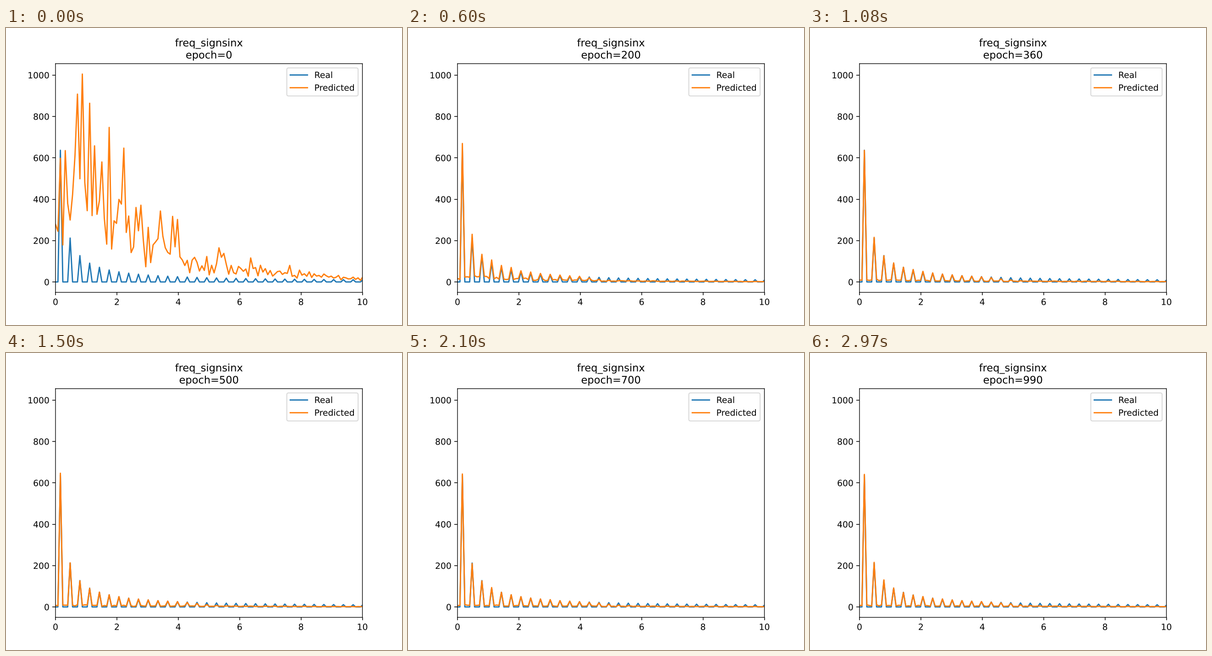
These frames come from a looping animation (864 by 648 pixels, 3000 ms). A matplotlib script:

```python
import numpy as np
import matplotlib.pyplot as plt
from matplotlib.animation import FuncAnimation
from matplotlib.patheffects import Normal

# Unhinted, unsnapped drawing: text and lines keep their subpixel positions
plt.rcParams.update({
    "path.snap": False,
    "text.hinting": "none",
    "path.effects": [Normal()],
    "axes.linewidth": 0.72,
})

FRAMES, STEP = 100, 10
N, BINS = 1000, 127
rng = np.random.default_rng(7)
bins = np.arange(BINS)

# Spectrum of sign(sin x) sampled over two periods
x = np.linspace(-2 * np.pi, 2 * np.pi, N)
freq = np.fft.fftfreq(N, x[1] - x[0])[:BINS]
real = np.abs(np.fft.fft(np.where(np.arange(N) // 250 % 2, -1, 1)))[:BINS]

# Untrained spectrum: tall peaks with random dips between them
peaks = {0: 278, 2: 598, 4: 635, 9: 908, 11: 1005, 14: 864, 16: 658, 19: 580,
         22: 747, 28: 647, 33: 360, 35: 371, 43: 343, 48: 317, 50: 302,
         57: 119, 62: 123, 67: 165, 69: 138, 75: 75, 80: 116, 96: 80, 126: 25}
top = np.interp(bins, list(peaks), list(peaks.values()))
dips = rng.uniform(0.3, 0.7, BINS) + 0.1 * (-1.0) ** bins
start = top * np.where(np.isin(bins, list(peaks)), 1, dips)

ripple = rng.uniform(0.3, 1.2, BINS)
flicker = rng.uniform(0.3, 1.2, (FRAMES, BINS))
wobble = rng.standard_normal((FRAMES, BINS))


def predicted(i):
    """Noise dies out while the real peaks are learned from low to high."""
    epoch = i * STEP
    settle = np.exp(-epoch / 100)
    cutoff = 4.1 + 1.3 * (1 - np.exp(-epoch / 500))
    gain = 0.12 + 0.88 / (1 + np.exp((freq - cutoff) / 0.3))
    gain *= 1 + 0.2 * settle + (0.012 + 0.1 * settle) * wobble[i]
    noise = 10 * np.exp(-freq / 6) + 120 * settle * np.exp(-freq / 2)
    learned = np.hypot(real * gain, noise * (ripple + flicker[i]) / 2)
    untrained = np.exp(-epoch / 45)
    return untrained * start + (1 - untrained) * learned


fig, ax = plt.subplots(figsize=(6.4, 4.8), dpi=135)
ax.plot(freq, real, label="Real")
line, = ax.plot(freq, start, label="Predicted")
ax.set_xlim(0, 10)
ax.set_ylim(-0.05 * start.max(), 1.05 * start.max())
ax.legend(loc="upper right")
title = ax.set_title("freq_signsinx\nepoch=0")


def update(i):
    line.set_ydata(predicted(i))
    title.set_text(f"freq_signsinx\nepoch={i * STEP}")
    return line, title


anim = FuncAnimation(fig, update, frames=FRAMES, interval=30,
                     repeat=True, repeat_delay=0)
plt.show()
```
